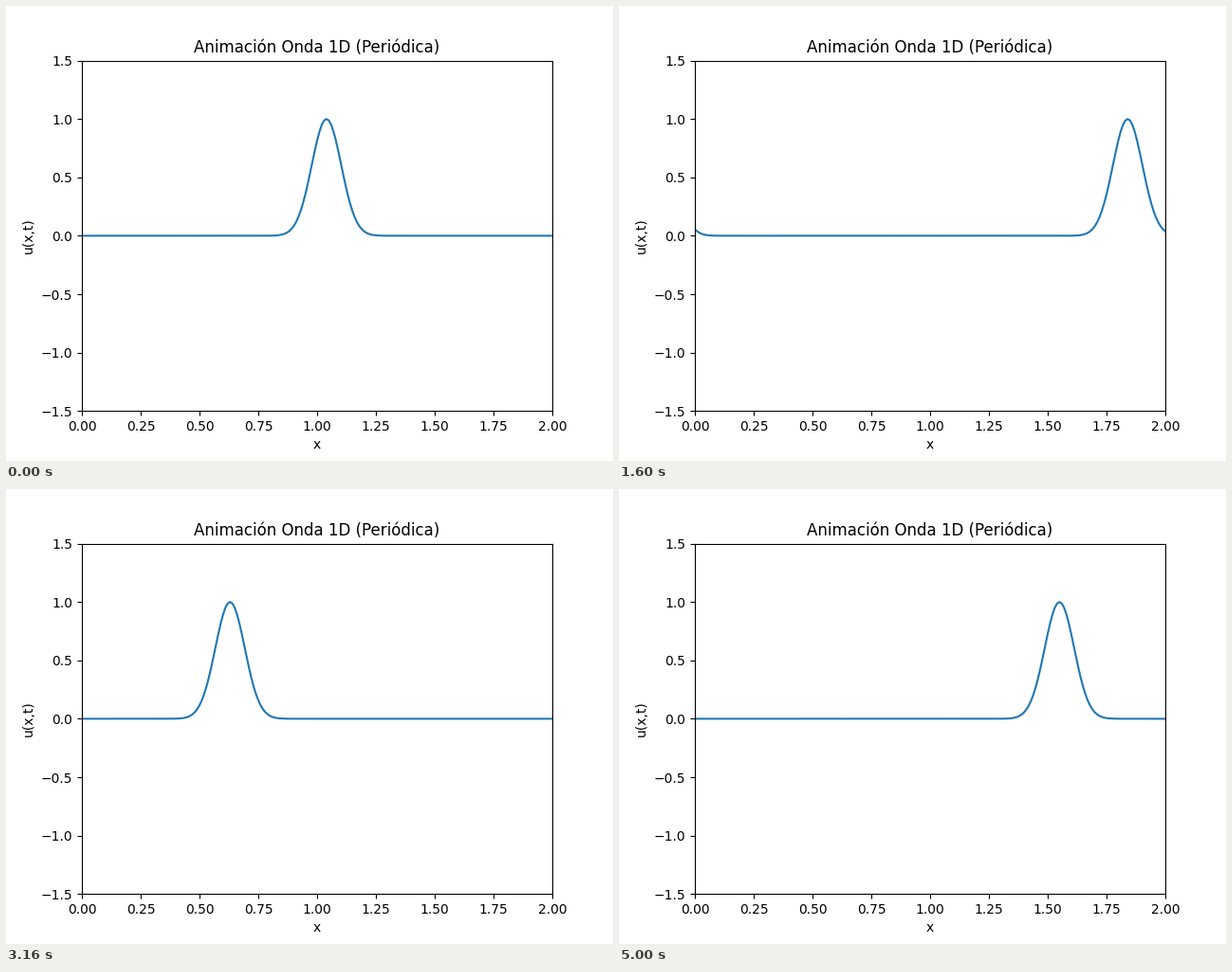
Write a matplotlib script that moves like this. It is 640 px wide and 480 px high and loops after 5.02 s.

```python
import numpy as np
import matplotlib.pyplot as plt
from matplotlib.animation import FuncAnimation

FRAMES = 251
INTERVAL = 20            # ms
DX = 0.01
START = 1.04             # pulse centre at t = 0
SHARPNESS = 128

x = np.linspace(0, 2, 201)
period = 2 - DX          # the two end cells overlap


def pulse(n):
    """Gaussian travelling one cell per frame on a periodic domain."""
    d = (x - START - n * DX + period / 2) % period - period / 2
    return np.exp(-SHARPNESS * d**2)


fig, ax = plt.subplots(figsize=(6.4, 4.8), dpi=100)
line, = ax.plot(x, pulse(0))
ax.set_xlim(0, 2)
ax.set_ylim(-1.5, 1.5)
ax.set_xlabel("x")
ax.set_ylabel("u(x,t)")
ax.set_title("Animación Onda 1D (Periódica)")


def update(n):
    line.set_ydata(pulse(n))
    return line,


anim = FuncAnimation(fig, update, frames=FRAMES, interval=INTERVAL,
                     repeat=True, repeat_delay=0, blit=False)
plt.show()
```
